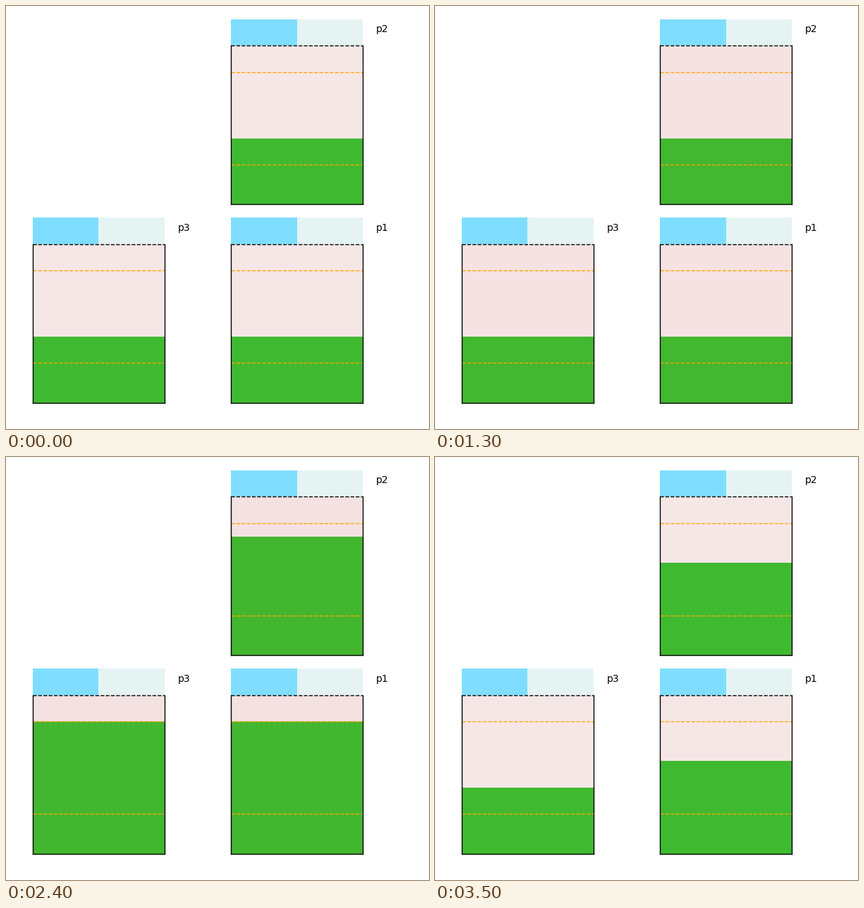
Recreate the animation shown at these times as a matplotlib script. Size 600x600 px, loop 3600 ms.

```python
import numpy as np
import matplotlib.pyplot as plt
from matplotlib.animation import FuncAnimation
from matplotlib.patches import Rectangle

FRAMES, INTERVAL = 36, 100
WIDTH, HEIGHT = 10, 12
LOW, HIGH = 3, 10
HEAT_PERIOD = 18

STEPS = [1, 8, 13, 18, 24, 31, 35]
# name: lower-left corner, swing between key steps, level at each key step
TANKS = {
    "p1": ((17, 2), -3, [5, 5, 5, 4, 10, 10, 7]),
    "p2": ((17, 17), 4, [5, 6, 5, 4, 9, 5, 7]),
    "p3": ((2, 2), -3, [5, 3, 5, 4, 10, 5, 5]),
}


def level(step, swing, keys):
    """Whole-number level that swings off the straight way between keys."""
    phase = np.interp(step, STEPS, range(len(STEPS)))
    raw = np.interp(step, STEPS, keys) + swing * abs(np.sin(np.pi * phase))
    return np.clip(np.rint(raw), LOW, HIGH)


def heat_alpha(step):
    return 0.123 - 0.018 * np.cos(2 * np.pi * step / HEAT_PERIOD)


fig = plt.figure(figsize=(6, 6), dpi=100, facecolor="white")
ax = fig.add_axes([0, 0, 1, 1])
ax.set(xlim=(0, 32), ylim=(0, 32))
ax.axis("off")


def box(x, y, w, h, color, alpha=1):
    return ax.add_patch(Rectangle((x, y), w, h, facecolor=color,
                                  alpha=alpha, linewidth=0))


def line(xs, ys, color, style="-"):
    ax.plot(xs, ys, color=color, linestyle=style, linewidth=1)


def build_tank(name, x, y):
    right, top = x + WIDTH, y + HEIGHT
    water = box(x, y, WIDTH, 0, "limegreen")
    heat = box(x, y, WIDTH, HEIGHT, "firebrick", 0.1)
    box(x, top, WIDTH / 2, 2, "deepskyblue", 0.5)
    box(x + WIDTH / 2, top, WIDTH / 2, 2, "darkcyan", 0.1)
    for mark in (LOW, HIGH):
        line([x, right], [y + mark] * 2, "orange", "--")
    line([x, right], [top, top], "black", "--")
    for side in (x, right):
        line([side, side], [y, top], "black")
    line([x, right], [y, y], "black")
    ax.text(right + 1, top + 1, name, fontsize=10, family="DejaVu Sans")
    return water, heat


parts = {name: build_tank(name, *tank[0]) for name, tank in TANKS.items()}


def update(step):
    for name, (water, heat) in parts.items():
        _, swing, keys = TANKS[name]
        water.set_height(level(step, swing, keys))
        heat.set_alpha(heat_alpha(step))
    return [p for pair in parts.values() for p in pair]


anim = FuncAnimation(fig, update, frames=FRAMES, interval=INTERVAL,
                     init_func=lambda: update(0), repeat=True, repeat_delay=0)
plt.show()
```
